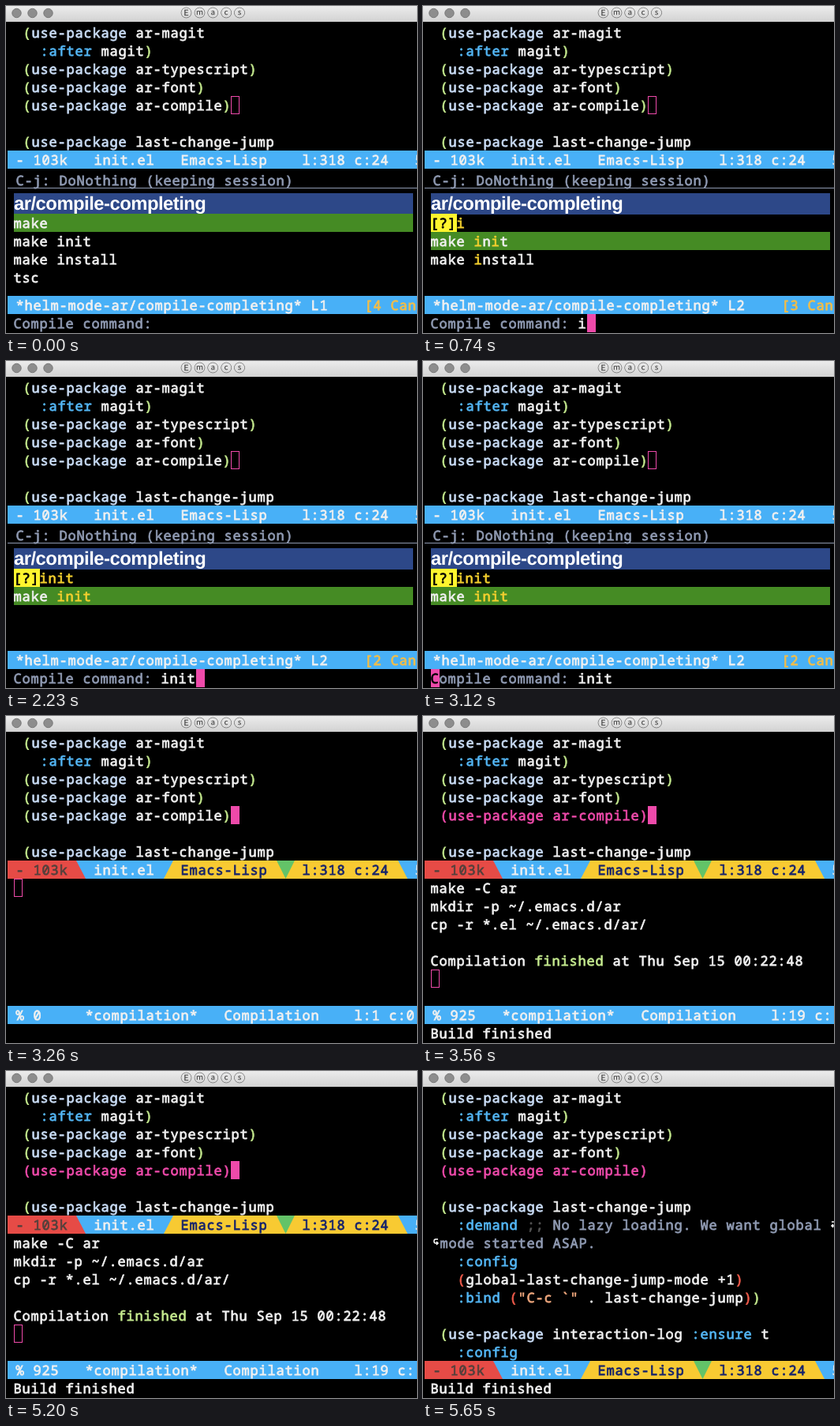
An HTML page that plays this animation: 521x414 px, repeating every 5800 ms.

```html
<!DOCTYPE html>
<html lang="en">
<head>
<meta charset="utf-8">
<title>Compile completion</title>
<style>
  html, body { margin: 0; width: 100%; height: 100%; overflow: hidden; background: #000; }
  svg { display: block; }
  text { white-space: pre; text-rendering: geometricPrecision; }
  .mono {
    font: 500 17px "Noto Sans Mono", "DejaVu Sans Mono", monospace;
    letter-spacing: .8px; stroke-width: .75px;
  }
  .source { font: bold 23.8px "Liberation Sans", Arial, sans-serif; letter-spacing: -.5px; }
  .title { font: 14.5px "DejaVu Sans", "Noto Sans CJK JP", sans-serif; text-anchor: middle; }
</style>
</head>
<body>
<svg id="stage" width="521" height="414" viewBox="0 0 521 414">
  <defs>
    <linearGradient id="bar" x2="0" y2="1">
      <stop stop-color="#ececec"/><stop offset="1" stop-color="#d2d2d2"/>
    </linearGradient>
  </defs>
  <g id="screen"></g>
  <rect width="521" height="20" fill="url(#bar)"/>
  <g id="chrome"></g>
</svg>
<script>
const CHAR = 11, ROW = 23, LOOP = 5800;
const C = {
  text: '#f0f0f0', key: '#c9dcf5', paren: '#c3e88d', blue: '#53b5f3', red: '#ee5a4a',
  string: '#eda67c', note: '#8f9ab2', dim: '#555555', pink: '#ee4aaa', mode: '#48b0f7',
  gold: '#f3cf2e', count: '#f2bd48', head: '#2d4888', green: '#458b24', navy: '#17246b',
  alert: '#e64b46', amber: '#f8ca32', leaf: '#63c368', hint: '#fff52e'
};

const esc = s => s.replace(/&/g, '&amp;').replace(/</g, '&lt;');
const rect = (x, y, w, h, fill) => `<rect x="${x}" y="${y}" width="${w}" height="${h}" fill="${fill}"/>`;
const poly = (points, fill) => `<polygon points="${points}" fill="${fill}"/>`;
const block = (x, y) => rect(x, y, CHAR, ROW, C.pink);
const hollow = (x, y) =>
  `<rect x="${x + .5}" y="${y + .5}" width="10" height="22" fill="none" stroke="${C.pink}"/>`;

// A row of coloured tokens: color, text, color, text...
function row(x, top, ...tokens) {
  let out = '';
  for (let i = 0; i < tokens.length; i += 2) {
    const [color, s] = [tokens[i], tokens[i + 1]];
    out += `<text class="mono" x="${x - .4}" y="${top + 18}" fill="${color}" stroke="${color}">${esc(s)}</text>`;
    x += s.length * CHAR;
  }
  return out;
}

const use = (line, name, ...rest) =>
  row(22, 22 + line * ROW, C.paren, '(', C.key, 'use-package', C.text, ' ' + name, ...rest);

function code(flash) {
  return use(0, 'ar-magit') +
    row(44, 45, C.blue, ':after', C.text, ' magit', C.paren, ')') +
    use(2, 'ar-typescript', C.paren, ')') +
    use(3, 'ar-font', C.paren, ')') +
    (flash ? row(22, 114, C.pink, '(use-package ar-compile)') : use(4, 'ar-compile', C.paren, ')')) +
    use(6, 'last-change-jump');
}

function moreCode() {
  const hook = (x, y, flip) =>
    `<path transform="translate(${x} ${y}) scale(${flip} 1)" d="M6 1H3Q1 1 1 3.5T3 6H6M4 4L6 6L4 8" fill="none" stroke="#fff" stroke-width="1.5"/>`;
  return row(44, 183, C.blue, ':demand', C.dim, ' ;; ', C.note, 'No lazy loading. We want global') +
    hook(524, 190, -1) + hook(13, 212, 1) +
    row(22, 206, C.note, 'mode started ASAP.') +
    row(44, 229, C.blue, ':config') +
    row(44, 252, C.red, '(', C.text, 'global-last-change-jump-mode +1', C.red, ')') +
    row(44, 275, C.blue, ':bind ', C.red, '(', C.string, '"C-c `"', C.text, ' . last-change-jump',
      C.red, ')', C.paren, ')') +
    use(13, 'interaction-log ', C.blue, ':ensure', C.text, ' t') +
    row(44, 344, C.blue, ':config');
}

function fileInfo(y, size, name, info) {
  return row(13, y, size, '- 103k') + row(112, y, name, 'init.el') +
    row(222, y, info, 'Emacs-Lisp') + row(376, y, info, 'l:318 c:24') + row(519, y, C.text, '5');
}
const modeBar = y => rect(2, y, 519, ROW, C.mode);

function activeBar(y) {
  const b = y + ROW;
  return modeBar(y) +
    poly(`2,${y} 89,${y} 101,${b} 2,${b}`, C.alert) +
    poly(`212,${y} 497,${y} 509,${b} 200,${b}`, C.amber) +
    poly(`343,${y} 366,${y} 354.5,${b}`, C.leaf) +
    fileInfo(y, '#54403c', C.text, C.navy);
}

// Text with every occurrence of the query in gold.
function match(s, query) {
  const parts = s.split(query);
  return parts.flatMap((p, i) => i ? [C.gold, query, C.text, p] : [C.text, p]);
}

function helm(query, typed, cursor) {
  const all = ['make', 'make init', 'make install', 'tsc'];
  const hits = query ? all.filter(s => s.includes(query)) : all;
  const selected = query ? 1 : 0;
  let out = code(false) + hollow(285, 114) +
    modeBar(183) + fileInfo(183, C.text, C.text, C.text) +
    row(13, 209, C.note, 'C-j: DoNothing (keeping session)') + rect(2, 230, 519, 1, C.note) +
    rect(10, 237, 506, 27, C.head) +
    `<text class="source" x="10" y="258" fill="#fff">ar/compile-completing</text>` +
    rect(10, 263 + selected * ROW, 506, ROW, C.green);
  if (query) {
    out += rect(10, 263, 33, ROW, C.hint) + row(10, 263, '#000', '[?]', C.gold, query);
  }
  hits.forEach((s, i) => {
    const tokens = query ? match(s, query) : [C.text, s];
    out += row(10, 263 + (i + selected) * ROW, ...tokens);
  });
  out += modeBar(367) +
    row(13, 367, C.text, `*helm-mode-ar/compile-completing* L${selected + 1}`) +
    row(455, 367, C.count, `[${hits.length + selected} Cand`);
  if (cursor >= 0) out += block(10 + cursor * CHAR, 390);
  out += row(10, 390, C.note, 'Compile command: ', C.text, typed);
  if (cursor === 0) out += block(10, 390) + row(10, 390, '#000', 'C');
  return out;
}

const output = [
  [],
  [[C.text, 'Compilation started at Thu Sep 15 00:22:48'], [], [C.text, 'make init'], [C.text, 'make -C ar']],
  [[C.text, 'make -C ar'], [C.text, 'mkdir -p ~/.emacs.d/ar'], [C.text, 'cp -r *.el ~/.emacs.d/ar/'], [],
   [C.text, 'Compilation ', C.paren, 'finished', C.text, ' at Thu Sep 15 00:22:48']]
];
const done = row(10, 390, C.text, 'Build finished');

function compile(step, cursor) {
  const lines = output[step];
  return code(step > 0) + (cursor ? block(285, 114) : '') + activeBar(183) +
    lines.map((tokens, i) => row(10, 206 + i * ROW, ...tokens)).join('') +
    hollow(10, 206 + lines.length * ROW) + modeBar(367) +
    row(13, 367, C.text, step === 2 ? '% 925' : '% 0') +
    row(101, 367, C.text, '*compilation*') + row(277, 367, C.text, 'Compilation') +
    row(442, 367, C.text, step === 2 ? 'l:19 c:' : 'l:1 c:0') +
    (step === 2 ? done : '');
}

const states = [
  [0, () => helm('', '', -1)],
  [450, () => helm('', '', 17)],
  [740, () => helm('i', 'i', 18)],
  [1040, () => helm('i', 'in', 19)],
  [1190, () => helm('ini', 'ini', 20)],
  [1330, () => helm('init', 'init', 21)],
  [1780, () => helm('init', 'init', -1)],
  [2230, () => helm('init', 'init', 21)],
  [2820, () => helm('init', 'init', -1)],
  [3120, () => helm('init', 'init', 0)],
  [3260, () => compile(0, true)],
  [3410, () => compile(1, true)],
  [3560, () => compile(2, true)],
  [3710, () => compile(2, false)],
  [4160, () => compile(2, true)],
  [4750, () => compile(2, false)],
  [5200, () => compile(2, true)],
  [5650, () => code(true) + moreCode() + activeBar(367) + done]
];

document.getElementById('chrome').innerHTML =
  [13.5, 33.5, 53.5].map(x => `<circle cx="${x}" cy="9" r="5.7" fill="#8d8d8d" stroke="#777"/>`).join('') +
  [...'Ⓔⓜⓐⓒⓢ'].map((c, i) =>
    `<text class="title" x="${228.5 + i * 16.9}" y="14" fill="#444">${c}</text>`).join('');

const screen = document.getElementById('screen');
let shown = -1;
function draw() {
  const t = performance.now() % LOOP;
  const now = states.findLastIndex(([start]) => t >= start);
  if (now !== shown) {
    shown = now;
    screen.innerHTML = states[now][1]();
  }
  requestAnimationFrame(draw);
}
draw();
</script>
</body>
</html>
```
